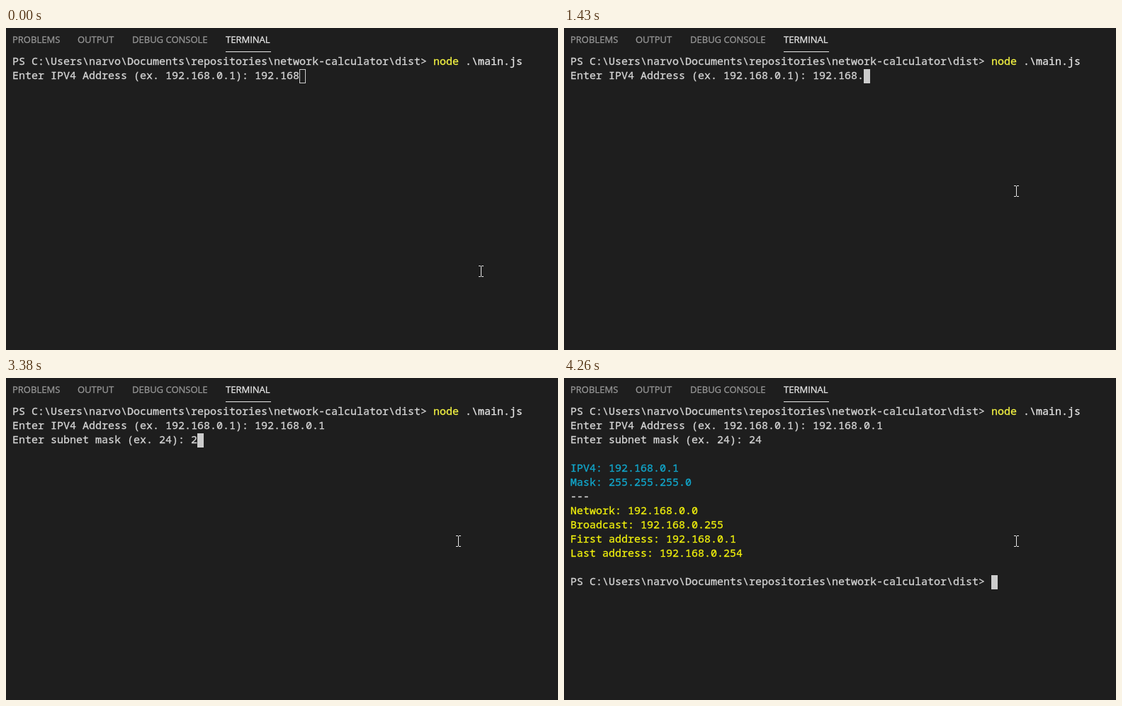
Recreate the animation shown at these times as an HTML page with a canvas. Size 779 by 454 pixels, loop 6.12 s.

```html
<!DOCTYPE html>
<html lang="en">
<head>
<meta charset="utf-8">
<title>Terminal</title>
<style>
html, body { margin: 0; width: 100%; height: 100%; overflow: hidden; background: #1e1e1e; }
canvas { display: block; }
</style>
</head>
<body>
<canvas id="stage" width="779" height="454"></canvas>
<script>
const ctx = document.getElementById('stage').getContext('2d');
const LOOP = 6120, LEFT = 9, TOP = 38, CELL = 9, ROW = 20;
const BG = '#1e1e1e', FG = '#d6d6d6', CURSOR = '#cccccc', CYAN = '#11a8cd', YELLOW = '#f2f20c';
const PROMPT = 'PS C:\\Users\\narvo\\Documents\\repositories\\network-calculator\\dist> ';
const ASK_IP = 'Enter IPV4 Address (ex. 192.168.0.1): ';
const ASK_MASK = 'Enter subnet mask (ex. 24): ';

// Key press times
const IP_KEYS = [1430, 1640, 2080, 2300], MASK_KEYS = [3380, 3810];
const FOCUS = 440, IP_ENTER = 2730, MASK_ENTER = 4150, DONE = 4260;

// Pointer: time, x, y, pressed
const POINTER = [
  [0, 670, 335], [100, 661, 303], [210, 648, 257], [330, 639, 225],
  [440, 638, 221, true], [530, 638, 222, true], [650, 638, 222]
];

const TABS = [['PROBLEMS', 9], ['OUTPUT', 101], ['DEBUG CONSOLE', 178], ['TERMINAL', 310]];
const RESULTS = [
  ['IPV4: 192.168.0.1', CYAN], ['Mask: 255.255.255.0', CYAN], ['---', FG],
  ['Network: 192.168.0.0', YELLOW], ['Broadcast: 192.168.0.255', YELLOW],
  ['First address: 192.168.0.1', YELLOW], ['Last address: 192.168.0.254', YELLOW]
];

const typed = (text, keys, t) => text.slice(0, keys.filter(k => k <= t).length);

function rect(x, y, w, h, color = CURSOR) {
  ctx.fillStyle = color;
  ctx.fillRect(x, y, w, h);
}

// A thin outline gives the letters a slightly firmer weight
function label(text, x, y, color) {
  ctx.fillStyle = ctx.strokeStyle = color;
  ctx.lineWidth = 0.3;
  ctx.fillText(text, x, y);
  ctx.strokeText(text, x, y);
}

function write(text, col, row, color = FG) {
  label(text, LEFT + col * CELL, TOP + row * ROW + 14, color);
}

function drawTabs() {
  ctx.font = '13px "Open Sans", "Noto Sans", sans-serif';
  for (const [name, x] of TABS) {
    label(name, x, 21, name === 'TERMINAL' ? '#e7e7e7' : '#979797');
  }
  rect(310, 33, 64, 1, '#e7e7e7');
}

function drawCursor(col, row, focused) {
  const x = LEFT + col * CELL, y = TOP + row * ROW;
  rect(x, y, CELL, ROW);
  if (!focused) rect(x + 1, y + 1, CELL - 2, ROW - 2, BG);
}

function drawTerminal(t) {
  ctx.font = '15px "Noto Sans Mono", "Liberation Mono", monospace';
  write(PROMPT, 0, 0);
  write('node', 66, 0, '#f5f543');
  write('.\\main.js', 71, 0, '#e5e5e5');

  const ipLine = ASK_IP + '192.168' + typed('.0.1', IP_KEYS, t);
  const maskLine = ASK_MASK + typed('24', MASK_KEYS, t);
  write(ipLine, 0, 1);
  if (t < IP_ENTER) return drawCursor(ipLine.length, 1, t >= FOCUS);
  write(maskLine, 0, 2);
  if (t < MASK_ENTER) return drawCursor(maskLine.length, 2, true);
  RESULTS.forEach(([text, color], i) => write(text, 0, 4 + i, color));
  const last = t < DONE ? '' : PROMPT;
  write(last, 0, 12);
  drawCursor(last.length, 12, true);
}

function drawPointer(t) {
  const [, x, y, pressed] = POINTER.filter(p => p[0] <= t).pop();
  if (pressed) {
    ctx.fillStyle = '#8b8612';
    ctx.beginPath();
    ctx.arc(636, 228, 15, 0, 2 * Math.PI);
    ctx.fill();
  }
  rect(x, y + 1, 1, 14, '#e8e8e8');
  for (const end of [y, y + 15]) {
    rect(x - 3, end, 3, 1, '#e8e8e8');
    rect(x + 1, end, 3, 1, '#e8e8e8');
  }
}

function frame(now) {
  const t = now % LOOP;
  rect(0, 0, 779, 454, BG);
  drawTabs();
  drawTerminal(t);
  drawPointer(t);
  requestAnimationFrame(frame);
}
requestAnimationFrame(frame);
</script>
</body>
</html>
```
